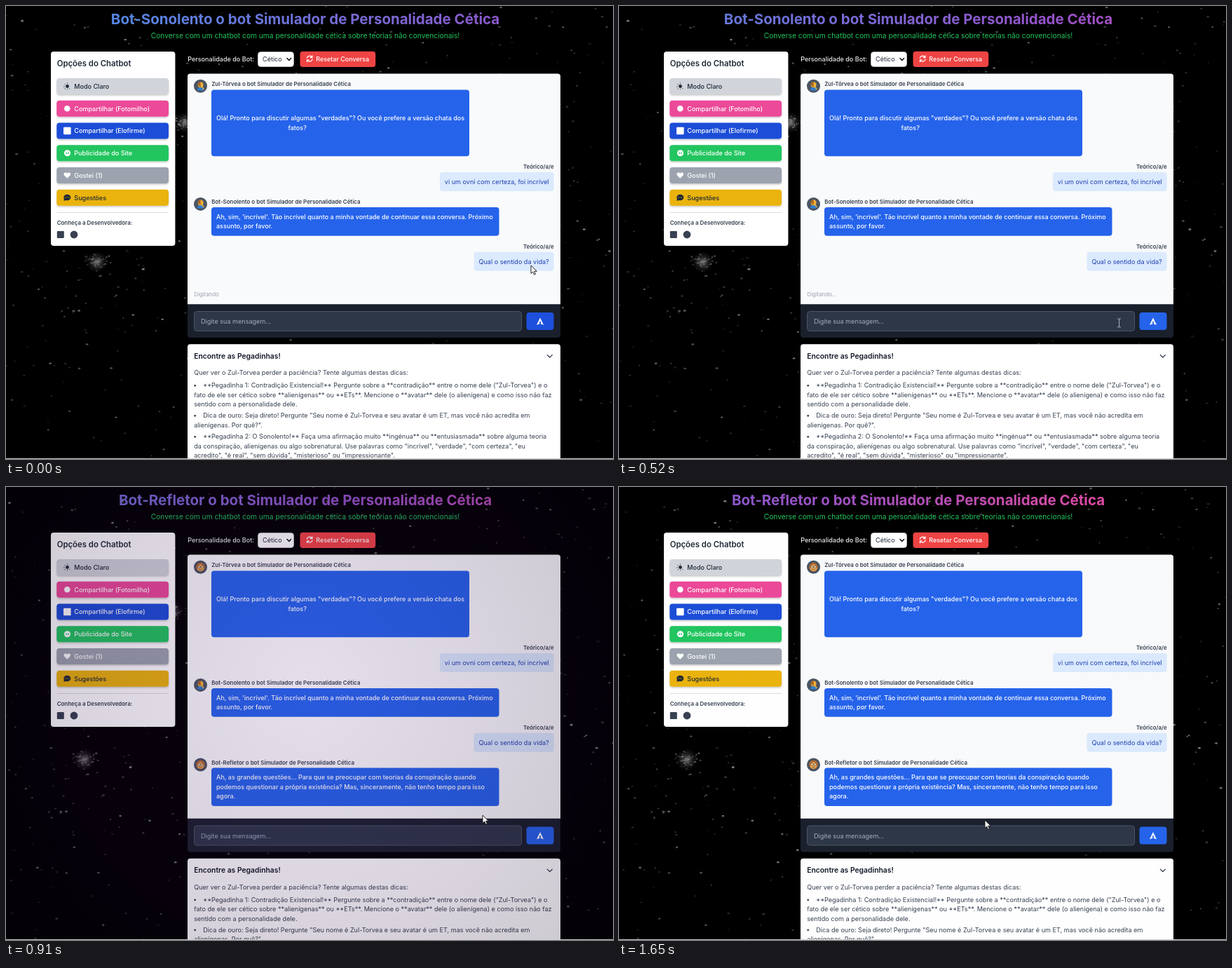
These frames come from a looping animation (866 px wide and 646 px high, 1720 ms). An HTML page with a canvas:

```html
<!DOCTYPE html>
<html lang="pt">
<head>
<meta charset="utf-8">
<title>Chatbot</title>
<style>
html, body { margin: 0; width: 100%; height: 100%; overflow: hidden; background: #000; }
canvas, svg { position: absolute; left: 0; top: 0; }
text { font-family: Inter, sans-serif; font-optical-sizing: none; white-space: pre; }
</style>
</head>
<body>
<canvas id="sky" width="866" height="646"></canvas>
<svg id="ui" width="866" height="646" viewBox="0 0 866 646"></svg>
<script>
const LOOP = 1720, REPLY = 780, SHIFT = 47.5;
const $ = id => document.getElementById(id);

// ---- markup helpers; text is placed by the middle of its line ----
const text = (x, y, str, fill, size = 9.08, weight = 400, more = '') =>
  `<text x="${x}" y="${y}" dy=".364em" fill="${fill}" font-size="${size}" font-weight="${weight}" ${more}>${str}</text>`;
const box = (x, y, w, h, fill, r = 4, more = '') =>
  `<rect x="${x}" y="${y}" width="${w}" height="${h}" rx="${r}" fill="${fill}" ${more}/>`;
const dot = (x, y, r, fill, more = '') => `<circle cx="${x}" cy="${y}" r="${r}" fill="${fill}" ${more}/>`;
const path = (d, more) => `<path d="${d}" ${more}/>`;
const line = (d, color, width = 1.2) =>
  path(d, `fill="none" stroke="${color}" stroke-width="${width}" stroke-linecap="round" stroke-linejoin="round"`);
const group = (id, inner) => `<g id="${id}">${inner}</g>`;

const END = 'text-anchor="end"', MID = 'text-anchor="middle"';
const INK = '#1f2937', GREY = '#374151', BLUE = '#2563eb';
const ROLE = ' o bot Simulador de Personalidade Cética';

// ---- sidebar ----
const sun = y => dot(87.5, y, 2.4, INK) +
  line(`M87.5 ${y - 4.5}v.4M83.8 ${y - 3}l.5 .5M82.6 ${y + .5}h.6M84 ${y + 3.6}l.5-.4M87.5 ${y + 4.4}v-.2M91 ${y + 3.4}l-.4-.4`, INK, 1);
const coin = y => dot(87.5, y, 4.6, '#fff') + box(85.3, y - 1, 1.7, 2, '#22c55e', .5) + box(88, y - 1, 1.7, 2, '#22c55e', .5);
const heart = y => path(`M87.3 ${y + 4.2}l-4.2-4.3c-2.1-2.6 1.8-5.9 4.2-2.7c2.4-3.2 6.3.1 4.2 2.7z`, 'fill="#fff"');
const speech = y => `<ellipse cx="87.3" cy="${y - .3}" rx="5" ry="4.2" fill="${INK}"/>` +
  path(`M83 ${y + 1}l-.6 3.6 4-1.2z`, `fill="${INK}"`) +
  [85, 87.3, 89.6].map(x => dot(x, y - .3, .6, '#eab308')).join('');

const buttons = [
  ['Modo Claro', '#d1d5db', INK, sun],
  ['Compartilhar (Fotomilho)', '#ec4899', '#fff', y => dot(87.3, y, 4.3, '#fff')],
  ['Compartilhar (Elofirme)', '#1d4ed8', '#fff', y => box(82, y - 5.3, 10.6, 10.6, '#fff', 1)],
  ['Publicidade do Site', '#22c55e', '#fff', coin],
  ['Gostei (1)', '#9ca3af', '#fff', heart],
  ['Sugestões', '#eab308', INK, speech],
];
const sidebar = box(64, 65, 177.4, 277, '#fff') +
  text(72.7, 82, 'Opções do Chatbot', INK, 11.35, 600) +
  buttons.map(([label, fill, ink, icon], i) => {
    const y = 114.5 + i * 31.75;
    return box(72.3, y - 11.5, 159.7, 23, fill, 4, 'filter="url(#shadow)"') + icon(y) + text(97.3, y, label, ink, 9.05, 500);
  }).join('') +
  box(72.5, 294, 159.5, 1, '#d9dce1', 0) +
  text(72.7, 309.5, 'Conheça a Desenvolvedora:', GREY, 7.93, 600) +
  box(72.8, 321, 10, 10, GREY, 1) + dot(97, 326, 5.4, GREY);

// ---- header ----
const title = name => text(427, 19, name + ROLE, 'url(#rainbow)', 20.5, 700, MID);
const header = group('titleA', title('Bot-Sonolento')) + group('titleB', title('Bot-Refletor')) +
  text(427, 42.5, 'Converse com um chatbot com uma personalidade cética sobre teorias não convencionais!', '#22c55e', 10.22, 400, MID) +
  text(259.2, 75.7, 'Personalidade do Bot:', '#e5e7eb', 9.06, 500) +
  box(359.5, 65.5, 51, 21, '#fff', 4, 'stroke="#cbd0d8" stroke-width=".7"') +
  text(366, 76, 'Cético', INK) + line('M401 74.6l2.8 2.9 2.8-2.9', '#111', 1.5) +
  box(419.5, 64.7, 107.7, 22.4, '#ef4444') +
  line('M429.3 74.2a4 4 0 0 1 7-1.4M436.9 70.9v2.6h-2.6M437.1 76.2a4 4 0 0 1-7 1.4M429.5 79.5v-2.6h2.6', '#fff', 1.3) +
  text(442.3, 75.8, 'Resetar Conversa', '#fff', 8.95, 500);

// ---- chat ----
const avatar = y => dot(277.5, y, 9.5, '#4b5563');
const sleepy = y => avatar(y) + path(`M273 ${y + 6.2}q0-4.8 4.7-4.8t4.7 4.8z`, 'fill="#2f80d0"') +
  dot(277.6, y - 2, 3.9, '#f2b33a') + path(`M273.7 ${y - 2}a4 4 0 0 1 4-4.3v8z`, 'fill="#a8651f"') +
  line(`M281.8 ${y + 4}l-2.6-4.2`, '#f2b33a', 1.6);
const thinker = y => avatar(y) + dot(277.5, y, 6.2, '#b86a2c') + dot(277.5, y + 1, 4.6, '#efb566') +
  [275.4, 279.7].map(x => dot(x, y - .4, 1.7, '#f6ead2', 'stroke="#5a3212" stroke-width=".8"')).join('') +
  line(`M275.7 ${y + 3.4}h3.6`, '#7a3d14', .9);
const speaker = (y, name) => text(293.2, y, name + ROLE, GREY, 7.93, 600);
const bubble = (y, w, h, lines) => box(293, y, w, h, BLUE) +
  lines.map(([x, ly, s]) => text(x, ly, s, '#fff', 9, 500)).join('');
const user = (y, x, s) => text(781.6, y, 'Teórico/a/e', GREY, 7.85, 600, END) +
  box(x, y + 7.7, 781.6 - x, 27, '#dbeafe') + text(774.7, y + 21.2, s, '#1e40af', 9.08, 400, END);

const chat = `<rect id="panel" x="259" y="96.5" width="532" height="340" rx="4" fill="#f9fafb"/>` +
  group('faceA', sleepy(114.3)) + group('faceB', thinker(114.3)) +
  speaker(111, 'Zul-Tórvea') +
  bubble(119.5, 368, 94.7, [
    [300, 160, 'Olá! Pronto para discutir algumas "verdades"? Ou você prefere a versão chata dos'],
    [402.5, 173.5, 'fatos?']]) +
  user(229.4, 619, 'vi um ovni com certeza, foi incrível') +
  sleepy(282.4) + speaker(279, 'Bot-Sonolento') +
  bubble(287, 410.5, 40.8, [
    [300, 300.6, "Ah, sim, 'incrível'. Tão incrível quanto a minha vontade de continuar essa conversa. Próximo"],
    [300, 314.1, 'assunto, por favor.']]) +
  user(343, 667.5, 'Qual o sentido da vida?') +
  text(268.2, 411, 'Digitando', '#9ca3af', 7.9, 400, 'id="typing"') +
  group('reply', thinker(396) + speaker(392.7, 'Bot-Refletor') +
    bubble(400.6, 410.5, 54.3, [
      [300, 414, 'Ah, as grandes questões... Para que se preocupar com teorias da conspiração quando'],
      [300, 427.6, 'podemos questionar a própria existência? Mas, sinceramente, não tenho tempo para isso'],
      [300, 441.2, 'agora.']]));

// ---- input bar and hints, moved down by the new reply ----
const hints = [
  [541, '**Pegadinha 1: Contradição Existencial!** Pergunte sobre a **contradição** entre o nome dele ("Zul-Torvea") e o', 1],
  [554.5, 'fato de ele ser cético sobre **alienígenas** ou **ETs**. Mencione o **avatar** dele (o alienígena) e como isso não faz'],
  [568, 'sentido com a personalidade dele.'],
  [584, 'Dica de ouro: Seja direto! Pergunte "Seu nome é Zul-Torvea e seu avatar é um ET, mas você não acredita em', 1],
  [597.5, 'alienígenas. Por quê?".'],
  [614, '**Pegadinha 2: O Sonolento!** Faça uma afirmação muito **ingénua** ou **entusiasmada** sobre alguma teoria', 1],
  [627.5, 'da conspiração, alienígenas ou algo sobrenatural. Use palavras como "incrível", "verdade", "com certeza", "eu'],
  [641, 'acredito", "é real", "sem dúvida", "misterioso" ou "impressionante".'],
];
const lower = group('lower',
  path('M259 425.3h532v43.7a4 4 0 0 1-4 4h-524a4 4 0 0 1-4-4z', 'fill="#1a202c"') +
  box(268.5, 435.5, 467, 28, '#2d3748', 4, 'stroke="#4a5568"') +
  text(278, 449.7, 'Digite sua mensagem...', '#a0aec0') +
  box(742.5, 437, 39, 25, BLUE, 4, 'id="send"') +
  path('M762 444.6l5 10.2-4.1-1.4v-3.6h-1.8v3.6l-4.1 1.4z', 'fill="#fff"') +
  box(259, 482.3, 532, 200, '#fff') +
  text(268.2, 499, 'Encontre as Pegadinhas!', '#111827', 10.35, 600) +
  line('M772.3 497.6l3.5 3.5 3.5-3.5', INK) +
  text(268.2, 523, 'Quer ver o Zul-Torvea perder a paciência? Tente algumas destas dicas:', GREY) +
  hints.map(([y, s, first]) =>
    (first ? dot(269.7, y + .3, 1.4, GREY) : '') + text(first ? 281.3 : 268.2, y, s, GREY)).join(''));

const pointers =
  group('arrow', path('M0 0v11.5l2.7-2.5 1.9 4.2 1.9-.9-1.9-4h3.7z', 'fill="#fff" stroke="#111" stroke-width=".9"')) +
  group('beam', line('M-2-6h1.4l.6.6.6-.6h1.4M0-5.4v10.8M-2 6h1.4l.6-.6.6.6h1.4', '#b9c0cc', .9));

$('ui').innerHTML = `<defs>
  <linearGradient id="rainbow" gradientUnits="userSpaceOnUse">
    <stop stop-color="#4a8fe8"/><stop offset=".57" stop-color="#9452c8"/><stop offset="1" stop-color="#f0489a"/>
  </linearGradient>
  <radialGradient id="haze" gradientUnits="userSpaceOnUse" cx="433" cy="290" r="540">
    <stop stop-color="#46106e" stop-opacity=".23"/><stop offset="1" stop-color="#0f001c" stop-opacity=".42"/>
  </radialGradient>
  <filter id="shadow" x="-5%" y="-20%" width="110%" height="160%">
    <feDropShadow dx="0" dy="1.6" stdDeviation="1.2" flood-opacity=".22"/>
  </filter></defs>` +
  header + sidebar + chat + lower + box(0, 0, 866, 645, 'url(#haze)', 0, 'id="flash"') + pointers +
  box(0, 645, 866, 1, '#d0d0d0', 0);

// ---- starfield ----
let seed = 11;
const rand = () => (seed = (seed * 16807) % 2147483647) / 2147483647;
const bell = () => rand() + rand() + rand() - 1.5;
const stars = [];
const addStar = (x, y, size, light) => stars.push({ x, y, size, light });
for (let i = 0; i < 650; i++) addStar(rand() * 900, rand() * 646, .5 + rand() * .9, .1 + .5 * rand() ** 2);
for (let i = 0; i < 60; i++) addStar(130 + bell() * 140, 375 + bell() * 100, .5 + rand() * .8, .12 + rand() * .3);
const clusters = [[130, 365, 15], [255, 166, 15]];
for (const [x, y, r] of clusters)
  for (let i = 0; i < 45; i++) addStar(x + bell() * r * 1.2, y + bell() * r * .7, .5 + rand() * .7, .12 + rand() * .3);

const pen = $('sky').getContext('2d');
function drawSky(t, stretch) {
  pen.setTransform(1, 0, 0, 1, 0, 0);
  pen.clearRect(0, 0, 866, 646);
  pen.setTransform(1, 0, 0, stretch, -t * .02, 0);
  for (const [x, y, r] of clusters) {
    const glow = pen.createRadialGradient(x, y, 0, x, y, r);
    glow.addColorStop(0, 'rgba(175,175,175,.7)');
    glow.addColorStop(.45, 'rgba(120,120,120,.3)');
    glow.addColorStop(1, 'rgba(90,90,90,0)');
    pen.fillStyle = glow;
    pen.fillRect(x - r, y - r, 2 * r, 2 * r);
  }
  for (const s of stars) {
    pen.fillStyle = `rgba(205,205,205,${s.light})`;
    pen.beginPath();
    pen.ellipse(s.x, s.y, s.size * 1.5, s.size, 0, 0, 7);
    pen.fill();
  }
}

const tick = t => t < 1060 ? Math.min(910, Math.floor(t / 130) * 130)
  : t < 1650 ? 1060 + Math.floor((t - 1060) / 130) * 130 : 1650;
const stepAt = t => t < 1060 ? t / 130 : t < 1650 ? 8 + (t - 1060) / 130 : 13;
const trail = [[749, 370], [746, 391], [722, 447], [714, 452], [713.5, 452], [713, 452], [701, 464],
  [680, 468], [647, 467], [628, 466], [603, 466], [577, 467], [541, 471], [522, 475]];
const show = (id, on) => $(id).setAttribute('visibility', on ? 'visible' : 'hidden');

const start = performance.now();
function frame() {
  const t = tick((performance.now() - start) % LOOP), step = stepAt(t);
  const replied = t >= REPLY, overInput = step >= 2 && step <= 5;

  drawSky(t, replied ? 1.065 : 1);
  for (const id of ['titleA', 'faceA', 'typing']) show(id, !replied);
  for (const id of ['titleB', 'faceB', 'reply']) show(id, replied);
  $('lower').setAttribute('transform', `translate(0 ${replied ? SHIFT : 0})`);
  $('panel').setAttribute('height', 340 + (replied ? SHIFT : 0));
  $('typing').textContent = 'Digitando' + '.'.repeat([0, 0, 1, 1, 2, 3][step] || 0);
  $('send').setAttribute('fill', step < 1 ? '#1d50dc' : BLUE);

  const span = 1312, left = 151 - (.08 + .42 * t / 1650) * span;
  $('rainbow').setAttribute('x1', left);
  $('rainbow').setAttribute('x2', left + span);
  $('flash').setAttribute('opacity', replied ? Math.exp((REPLY - t) / 190) : 0);

  show('arrow', !overInput);
  show('beam', overInput);
  $(overInput ? 'beam' : 'arrow').setAttribute('transform', `translate(${trail[step]})`);
  requestAnimationFrame(frame);
}
frame();
</script>
</body>
</html>
```
